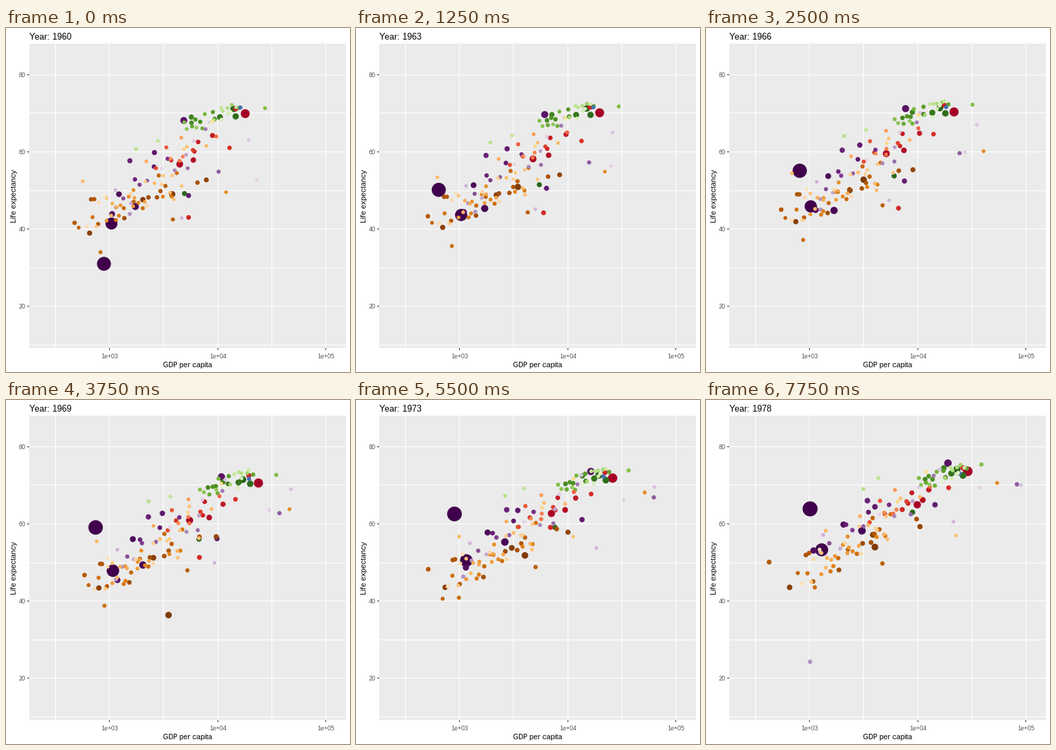
These frames come from a looping animation (504 px wide and 504 px high, 8000 ms). A matplotlib script:

```python
import numpy as np
import matplotlib.pyplot as plt
from matplotlib.animation import FuncAnimation
from matplotlib.colors import LinearSegmentedColormap
from matplotlib.patches import Rectangle

SIZE, FRAMES, STEP = 504, 32, 250
TIME = np.linspace(0, 1, FRAMES)
YEARS = 1960 + np.arange(FRAMES) * 58 / 99
GROWTH = 0.08
rng = np.random.default_rng(12)


def ramp(*colors):
    return LinearSegmentedColormap.from_list("ramp", colors)


# Dark shades belong to the most populous countries of a continent.
AFRICA = ramp("#7f3b08", "#b35806", "#e08214", "#fdb863", "#fee0b6")
AMERICA = ramp("#a50026", "#d73027", "#f46d43", "#fdae61", "#fee090")
ASIA = ramp("#40004b", "#762a83", "#9970ab", "#c2a5cf", "#e7d4e8")
EUROPE = ramp("#276419", "#4d9221", "#7fbc41", "#b8e186", "#e6f5d0")
OCEANIA = ramp("#313695", "#4575b4")

dots = []


def country(cmap, shade, r, *points, dip=None):
    """Follow evenly timed key points; dip is (year, depth, width) of a crisis."""
    keys = np.linspace(0, 1, len(points))
    track = np.column_stack([np.interp(TIME, keys, axis) for axis in zip(*points)])
    if dip:
        year, depth, width = dip
        track[:, 1] += depth * np.clip((width - abs(YEARS - year)) / (0.6 * width), 0, 1)
    dots.append((r, cmap(float(shade)), track + 0.5))


def swarm(cmap, n, start, end, spread):
    """Scatter n smaller countries about a line that moves from start to end."""
    along = rng.permutation((np.arange(n) + 0.5) / n)[:, None]
    first, last = (np.array(a) + (np.array(b) - a) * along for a, b in (start, end))
    noise = rng.uniform(-1.6, 1.6, (n, 2)) * spread
    sway = rng.normal(0, 3, (n, 2))
    for i, shade in enumerate(np.linspace(0.15, 1, n)):
        p, q = first[i] + noise[i], last[i] + noise[i]
        middle = (p + q) / 2 + sway[i]
        country(cmap, shade, 2.6 + (1 - shade) ** 2, p, middle, q)


country(ASIA, 0, 10.2, (143, 345), (120, 233), (138, 207), (130, 184),
        (143, 168), (146, 162), (152, 159))
country(ASIA, 0, 8.8, (154, 286), (153, 260), (160, 237), (169, 219))
country(ASIA, .04, 5.2, (189, 261), (187, 267), (216, 210), (228, 191))
country(ASIA, .07, 4.2, (165, 243), (186, 202), (201, 182))
country(ASIA, .09, 4.3, (155, 272), (163, 263), (157, 220))
country(ASIA, .12, 5.1, (260, 135), (293, 117), (342, 106), (354, 92))
country(ASIA, .15, 3.8, (217, 182), (229, 165), (247, 156))
country(ASIA, .2, 3.8, (181, 194), (209, 170), (236, 147))
country(ASIA, .17, 3.7, (267, 245), (291, 223), (330, 178), (335, 153))
country(ASIA, .42, 3, (311, 210), (373, 182), (433, 145), (455, 123))
country(ASIA, .66, 3, (181, 272), (160, 262), (152, 253), dip=(1976.7, 130, 3.7))
country(ASIA, .9, 2.6, (355, 164), (419, 129), (461, 124))
country(ASIA, .97, 2.6, (367, 222), (386, 159), (400, 128))
country(ASIA, .85, 2.6, (257, 278), (268, 251), (350, 222), (362, 178))
swarm(ASIA, 16, ((145, 270), (295, 155)), ((150, 230), (340, 118)), (9, 13))

country(AMERICA, 0, 6.5, (350, 125), (370, 121), (383, 104))
country(AMERICA, .03, 5, (254, 199), (269, 175), (309, 153))
country(AMERICA, .07, 4, (274, 193), (298, 171), (317, 146))
country(AMERICA, .14, 3.7, (302, 157), (318, 152), (326, 131))
country(AMERICA, .18, 3.7, (336, 118), (356, 110), (376, 99))
country(AMERICA, .22, 3.5, (267, 277), (282, 263), (284, 190), (287, 160))
country(AMERICA, .25, 3.3, (327, 175), (336, 144), (355, 128))
swarm(AMERICA, 17, ((215, 215), (305, 140)), ((235, 190), (325, 108)), (8, 13))

country(EUROPE, 0, 4.8, (333, 118), (347, 116), (367, 101))
country(EUROPE, .03, 3.7, (261, 242), (283, 202), (302, 164))
country(EUROPE, .05, 4.6, (336, 129), (358, 122), (376, 110))
country(EUROPE, .09, 4.3, (313, 130), (341, 120), (359, 107))
country(EUROPE, .16, 3.8, (271, 130), (319, 119), (348, 99))
country(EUROPE, .52, 2.9, (379, 117), (396, 109), (403, 94))
country(EUROPE, .8, 2.7, (222, 165), (241, 140), (252, 114))
country(EUROPE, .74, 2.7, (190, 177), (209, 147), (230, 130))
swarm(EUROPE, 22, ((264, 148), (338, 112)), ((315, 124), (378, 96)), (5, 6))

country(OCEANIA, .9, 3, (343, 116), (356, 115), (371, 107))

country(AFRICA, 0, 4.6, (243, 243), (230, 221), (247, 229), (247, 215), dip=(1969, 90, 2.5))
country(AFRICA, .03, 4, (200, 251), (216, 230), (244, 197))
country(AFRICA, .05, 3.8, (122, 300), (136, 274), (122, 274))
country(AFRICA, .1, 3.6, (293, 222), (308, 199), (313, 185))
country(AFRICA, .2, 3.3, (280, 226), (283, 199), (308, 174))
country(AFRICA, .26, 3.3, (100, 285), (115, 255), (92, 237))
country(AFRICA, .3, 3, (244, 280), (266, 248), (258, 239))
country(AFRICA, .33, 2.8, (106, 292), (121, 270), (134, 253), dip=(1972, 150, 1))
country(AFRICA, .38, 2.9, (138, 328), (144, 300), (159, 274))
country(AFRICA, .54, 2.7, (322, 240), (409, 178), (422, 137), (426, 121))
country(AFRICA, .75, 2.6, (112, 224), (133, 206), (175, 191))
country(AFRICA, .82, 2.6, (257, 231), (283, 201), (366, 198))
swarm(AFRICA, 42, ((118, 276), (250, 228)), ((140, 255), (270, 180)), (10, 14))

dots.sort(key=lambda d: -d[0])
radii, colors, tracks = zip(*dots)
radii, tracks = np.array(radii), np.array(tracks)

plt.rcParams.update({"font.family": "Liberation Sans", "text.hinting": "default",
                     "text.hinting_factor": 1})
fig = plt.figure(figsize=(SIZE / 72, SIZE / 72), dpi=72, facecolor="white")
ax = fig.add_axes([0, 0, 1, 1])
ax.set(xlim=(0, SIZE), ylim=(SIZE, 0))
ax.axis("off")


def box(x, y, w, h, color):
    ax.add_patch(Rectangle((x, y), w, h, fc=color, lw=0, antialiased=False, zorder=0))


def label(x, y, text, size, color="black", **kw):
    return ax.text(x, y, text, size=size, color=color, va="baseline", **kw)


box(34, 23, 464, 446, "#ebebeb")
for k in range(6):
    box(round(72 + 79.2 * k), 23, 1, 446, "white")
for k in range(8):
    box(34, int(464.6 - 56.65 * k), 464, 1, "white")
for k in range(3):
    x = round(151.2 + 158.4 * k)
    box(x, 469, 1, 3, "#333333")
    label(x + 0.5, 483.5, f"1e+0{k + 3}", 9, "#4d4d4d", ha="center")
for k in range(4):
    y = int(407.95 - 113.3 * k)
    box(31, y, 3, 1, "#333333")
    label(29, y + 4, str(20 * (k + 1)), 9, "#4d4d4d", ha="right")
label(266, 497, "GDP per capita", 11, ha="center")
ax.text(17.5, 246, "Life expectancy", size=11, rotation=90, ha="right", va="center")
title = label(34, 17, "", 13, ha="left")

cloud = ax.scatter(*tracks[:, 0].T, c=colors, s=(2 * radii) ** 2, linewidths=0,
                   snap=False, zorder=3)


def draw(i):
    cloud.set_offsets(tracks[:, i])
    cloud.set_sizes((2 * radii * (1 + GROWTH * TIME[i])) ** 2)
    title.set_text(f"Year: {round(YEARS[i])}")
    return cloud, title


anim = FuncAnimation(fig, draw, frames=FRAMES, interval=STEP, repeat=True, repeat_delay=0)
plt.show()
```
